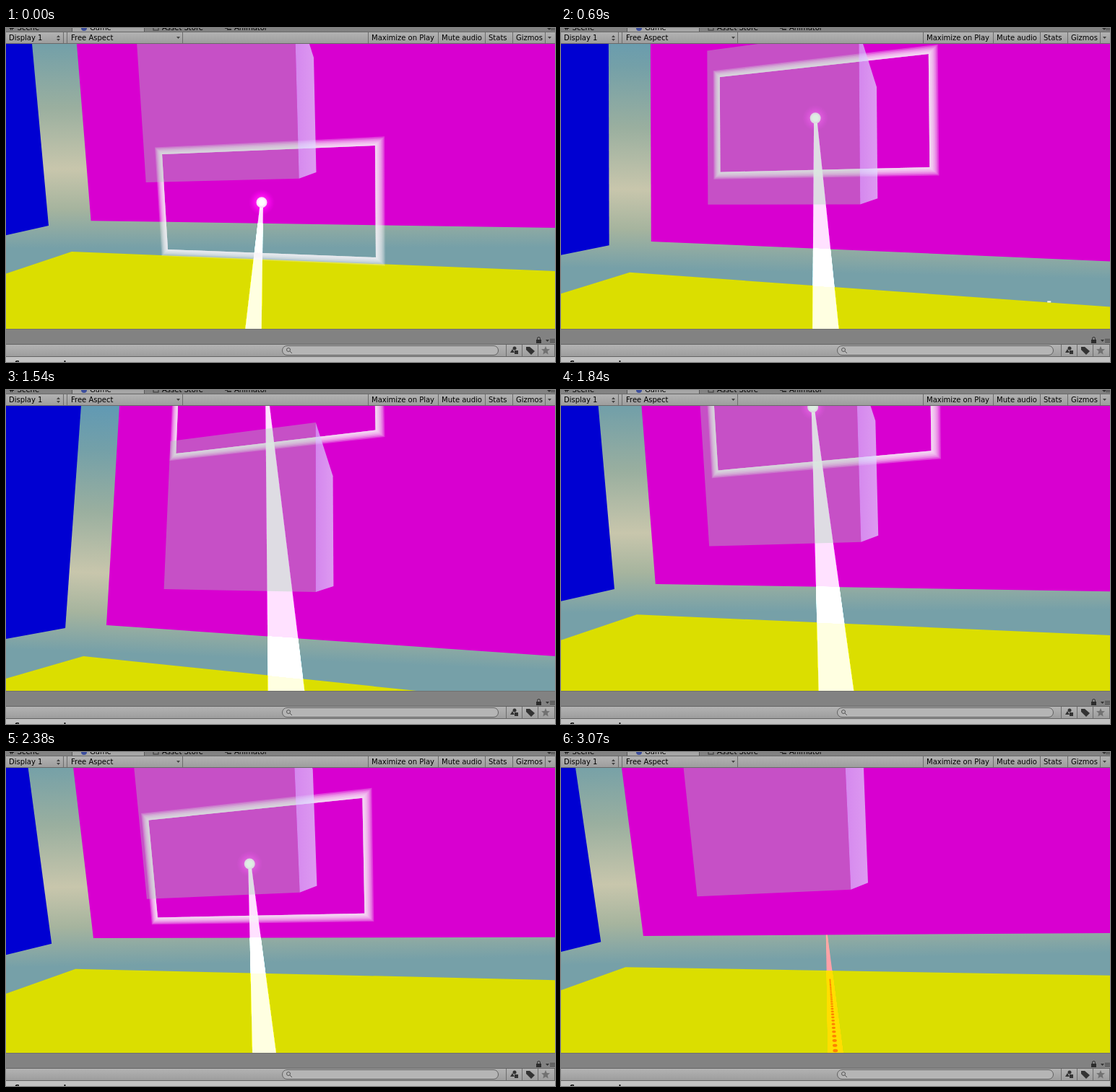
Animation, 760 px wide and 463 px high, one loop 3.15 s. Source, as an HTML page:

```html
<!DOCTYPE html>
<html lang="en">
<head>
<meta charset="utf-8">
<title>Room view</title>
<style>
  html, body { margin: 0; width: 100%; height: 100%; overflow: hidden; background: #828282; }
  svg { display: block; width: 760px; height: 463px; }
  text { font: 10px "DejaVu Sans", sans-serif; fill: #000; }
  #beam { mix-blend-mode: plus-lighter; }
</style>
</head>
<body>
<svg viewBox="0 0 760 463">
  <defs>
    <linearGradient id="sky" gradientUnits="userSpaceOnUse" x1="0" y1="-300" x2="0" y2="200">
      <stop offset="0" stop-color="#4c92c0"/>
      <stop offset=".26" stop-color="#74a0a8"/>
      <stop offset=".43" stop-color="#9aaf9f"/>
      <stop offset=".6" stop-color="#c8c6ac"/>
      <stop offset=".71" stop-color="#a6b49e"/>
      <stop offset=".82" stop-color="#76a0a8"/>
    </linearGradient>
    <linearGradient id="side">
      <stop offset="0" stop-color="#d2c0fa"/>
      <stop offset="1" stop-color="#e0dcff"/>
    </linearGradient>
    <radialGradient id="halo">
      <stop offset=".3" stop-color="#ff28f4"/>
      <stop offset=".65" stop-color="#f808ee" stop-opacity=".7"/>
      <stop offset="1" stop-color="#f000e8" stop-opacity="0"/>
    </radialGradient>
    <radialGradient id="orb">
      <stop offset=".5" stop-color="#fff"/>
      <stop offset="1" stop-color="#fbd4fa"/>
    </radialGradient>
    <linearGradient id="bar" x2="0" y2="1">
      <stop offset="0" stop-color="#b4b4b4"/>
      <stop offset="1" stop-color="#9c9c9c"/>
    </linearGradient>
  </defs>

  <rect y="22" width="760" height="395" fill="url(#sky)"/>
  <polygon id="blue" fill="#0000d2"/>
  <polygon id="magenta" fill="#d800d0"/>
  <polygon id="yellow" fill="#dbde00"/>
  <rect id="speck" width="5" height="2" fill="#fffde8"/>
  <circle id="glow" r="18" fill="url(#halo)"/>
  <polygon id="beam"/>
  <g id="ring" fill="#f6f2f4" fill-rule="evenodd"></g>
  <circle id="ball" r="7.5" fill="url(#orb)"/>
  <g id="dots" fill="#ff8200"></g>
  <polygon id="front" fill="#a9d2b6" opacity=".38"/>
  <polygon id="flank" fill="url(#side)" opacity=".7"/>

  <!-- upper chrome -->
  <rect width="760" height="22" fill="#828282"/>
  <rect x="92" width="99" height="6" fill="#a6a6a6"/>
  <path d="M91.5 0V5M191.5 0V5" stroke="#585858"/>
  <text x="4" y="3"># Scene</text>
  <circle cx="108" cy="0" r="4" fill="#3b4d9c"/>
  <text x="116" y="3">Game</text>
  <rect x="204" y="-4" width="7" height="7" fill="none" stroke="#333"/>
  <text x="216" y="3">Asset Store</text>
  <path d="M303 0h4M306 2h6" stroke="#333" stroke-width="2"/>
  <text x="316" y="3">Animator</text>
  <path d="M749 0h6l-3 3z" fill="#333"/>
  <path d="M754 .5h6M754 2.5h6" stroke="#444"/>
  <rect y="5" width="760" height="17" fill="url(#bar)"/>
  <path d="M0 5.5H760M0 21.5H760" stroke="#696969"/>
  <path d="M79.5 6V21M84.5 6V21M244.5 6V21M501.5 6V21M598.5 6V21M663.5 6V21M701.5 6V21M746.5 6V21" stroke="#6c6c6c"/>
  <text x="4" y="17">Display 1</text>
  <text x="90" y="17">Free Aspect</text>
  <text x="506" y="17">Maximize on Play</text>
  <text x="603" y="17">Mute audio</text>
  <text x="668" y="17">Stats</text>
  <text x="706" y="17">Gizmos</text>
  <path d="M70 13l2.5-3 2.5 3zM70 15h5l-2.5 3zM236 12h5l-2.5 3zM750 12h5l-2.5 3z" fill="#444"/>

  <!-- lower chrome -->
  <rect y="417" width="760" height="46" fill="#828282"/>
  <path d="M0 417.5H760" stroke="#707070"/>
  <rect x="734" y="432" width="7" height="5" fill="#2c2c2c"/>
  <path d="M735.5 432v-1.5a2 2 0 0 1 4 0V432" fill="none" stroke="#2c2c2c"/>
  <path d="M747 432h5l-2.5 3z" fill="#333"/>
  <path d="M753 431.5h7M753 433.5h7M753 435.5h7" stroke="#444"/>
  <rect y="438" width="760" height="18" fill="url(#bar)"/>
  <path d="M0 438.5H760M0 455.5H760" stroke="#646464"/>
  <rect x="382.5" y="440.5" width="299" height="13" rx="6.5" fill="#b5b5b5" stroke="#606060"/>
  <circle cx="391" cy="446" r="2.5" fill="none" stroke="#555"/>
  <path d="M393 448l3 3" stroke="#555"/>
  <path d="M692.5 439V455M714.5 439V455M736.5 439V455M759.5 439V455" stroke="#6c6c6c"/>
  <path d="M698 450l3-5 3 5zM704 447h5v5h-5z" fill="#333"/>
  <circle cx="704" cy="444" r="2.5" fill="#333"/>
  <path d="M720 442h5l7 6-5 5-7-7z" fill="#333"/>
  <path d="M747 441l1.7 4 4.3.3-3.3 2.8 1 4.4-3.7-2.3-3.7 2.3 1-4.4-3.3-2.8 4.3-.3z" fill="#717171"/>
  <rect y="456" width="760" height="7" fill="#c2c2c2"/>
  <text x="12" y="469" style="font-weight:bold">Scene search</text>
</svg>

<script>
const LOOP = 3150, STEPS = 41, MISS_STEP = 36;
const CENTER = { x: 380, y: 219.5 }, FOCAL = 420, BOTTOM = 417;

// Head and hand: step, yaw, pitch, roll, aim x, aim y, hand x
const KEYS = [
  [0, -.0544, .0773, .031, -4, 54, 342.5],
  [5, -.0432, .0281, .014, -10, -25, 348],
  [13, -.0266, -.0383, .002, -14.5, -167, 383.5],
  [20, 0, -.088, -.01, -22, -260, 388],
  [24, -.0315, .0717, .035, -10.5, -161, 381],
  [31, -.05, .1093, .049, -18, -20, 357.5],
  [40, -.0622, .1196, .051, 12, 85, 380]];

// The room as a level camera sees it, measured from the view centre
const WALL_DEPTH = 1446;   // distance to the wall's vanishing point
const wallFoot = x => .058 * (x + WALL_DEPTH);
const floorEdge = x => 111.6 + (x + 264) * (x < -264 ? -.298 : .0908);
const blueFoot = x => 74.7 - .191 * (x + 291);
const FAR_LEFT = -600, FAR_RIGHT = 700, CEILING = -330, GROUND = 600;

const $ = id => document.getElementById(id);
const lerp = (a, b, t) => a + (b - a) * t;
const set = (el, attrs) => Object.entries(attrs).forEach(([k, v]) => el.setAttribute(k, v));
const show = (id, on) => set($(id), { visibility: on ? "visible" : "hidden" });
const poly = (id, ...points) => set($(id), { points: points.join(" ") });

function add(parent, tag, count, attrs = {}) {
  return Array.from({ length: count }, () => {
    const el = document.createElementNS("http://www.w3.org/2000/svg", tag);
    set(el, attrs);
    return parent.appendChild(el);
  });
}
const ringLayers = add($("ring"), "path", 8, { opacity: .23 });
const dots = add($("dots"), "ellipse", 34);

// Monotone cubic through the keys
function poseAt(step) {
  const last = KEYS.length - 1;
  let k = 0;
  while (k < last - 1 && step >= KEYS[k + 1][0]) k++;
  const span = KEYS[k + 1][0] - KEYS[k][0];
  const u = (step - KEYS[k][0]) / span, v = 1 - u;
  return KEYS[k].map((from, c) => {
    const to = KEYS[k + 1][c];
    const secant = j => (KEYS[j + 1][c] - KEYS[j][c]) / (KEYS[j + 1][0] - KEYS[j][0]);
    const slope = j => {
      const a = secant(Math.max(j - 1, 0)), b = secant(Math.min(j, last - 1));
      return a * b <= 0 ? 0 : 2 * a * b / (a + b);
    };
    return from * v * v * (1 + 2 * u) + to * u * u * (3 - 2 * u)
      + span * u * v * (slope(k) * v - slope(k + 1) * u);
  });
}

// Turns a level view point into a screen point for the given head rotation
function camera(yaw, pitch, roll) {
  const turn = (a, b, angle) => [
    a * Math.cos(angle) + b * Math.sin(angle),
    b * Math.cos(angle) - a * Math.sin(angle)];
  return (x, y) => {
    const [side, ahead] = turn(x, FOCAL, yaw);
    const [depth, down] = turn(ahead, y, pitch);
    const [sx, sy] = turn(side * FOCAL / depth, down * FOCAL / depth, roll);
    return [CENTER.x + sx, CENTER.y + sy];
  };
}

function drawRoom(project, pitch) {
  const span = (id, left, right, top, foot) => poly(id,
    project(left, top), project(right, top), project(right, foot(right)), project(left, foot(left)));
  span("blue", FAR_LEFT, -291, CEILING, blueFoot);
  span("magenta", -235.5, FAR_RIGHT, CEILING, wallFoot);
  poly("yellow", ...[FAR_LEFT, -264, FAR_RIGHT].map(x => project(x, floorEdge(x))),
    project(FAR_RIGHT, GROUND), project(FAR_LEFT, GROUND));

  const [hx, hy] = project(-235, 0), [rx, ry] = project(372, 18);
  const tilt = Math.atan2(ry - hy, rx - hx) * 180 / Math.PI;
  set($("sky"), { gradientTransform: `translate(${hx} ${hy}) rotate(${tilt})` });

  const [sx, sy] = project(316, floorEdge(316));
  set($("speck"), { x: sx - 2, y: sy - 2 });
  show("speck", pitch < .05);

  const nearTop = project(49, -220), nearFoot = project(49, 22.7);
  poly("front", project(-159.5, -190), nearTop, nearFoot, project(-159.5, 20.8));
  poly("flank", nearTop, project(73.4, -141), project(73.4, 14.6), nearFoot);
}

// A frame lying on the wall, so its right side is nearer and taller
function drawRing(project, aimX, aimY) {
  const middle = aimX + WALL_DEPTH;
  const quad = inset => {
    const corner = (sx, sy) => {
      const depth = 1 / (1 / middle - sx * .000075 * (1 - .07 * inset));
      return project(depth - WALL_DEPTH, depth * (aimY / middle + sy * .0575 * (1 - .13 * inset)));
    };
    return `M${[corner(-1, -1), corner(1, -1), corner(1, 1), corner(-1, 1)].join(" ")}Z`;
  };
  ringLayers.forEach((el, i) => set(el, { d: quad(i / ringLayers.length) + quad(1) }));
}

function drawBeam([x, y], hand, missed) {
  const half = (52 - .12 * (y + 5)) / 2, tip = missed ? 1 : 2;
  poly("beam", x - tip, y, x + tip, y, hand + half, BOTTOM, hand - half, BOTTOM);
  set($("beam"), { fill: missed ? "#8c0000" : "#e1e1e1" });
}

function drawDots([x, y], hand, floorY) {
  dots.forEach((el, i) => {
    const near = .935 ** i, cy = lerp(floorY, 414, near);
    const cx = lerp(x, hand, (cy - y) / (BOTTOM - y));
    set(el, { cx, cy, rx: .8 + 2.6 * near, ry: .3 + 1.9 * near });
  });
}

function render(time) {
  const step = Math.min(STEPS - 1, Math.floor((time % LOOP + 5) * STEPS / LOOP));
  const [, yaw, pitch, roll, aimX, aimY, hand] = poseAt(step);
  const project = camera(yaw, pitch, roll);
  const missed = step >= MISS_STEP;
  const tip = project(aimX, missed ? wallFoot(aimX) : aimY);

  drawRoom(project, pitch);
  drawRing(project, aimX, aimY);
  drawBeam(tip, hand, missed);
  drawDots(tip, hand, project(aimX, floorEdge(aimX))[1]);
  for (const id of ["ball", "glow"]) set($(id), { cx: tip[0], cy: tip[1] });
  for (const id of ["ball", "glow", "ring"]) show(id, !missed);
  show("dots", missed);
}

const start = performance.now();
function tick() {
  render(performance.now() - start);
  requestAnimationFrame(tick);
}
tick();
</script>
</body>
</html>
```
